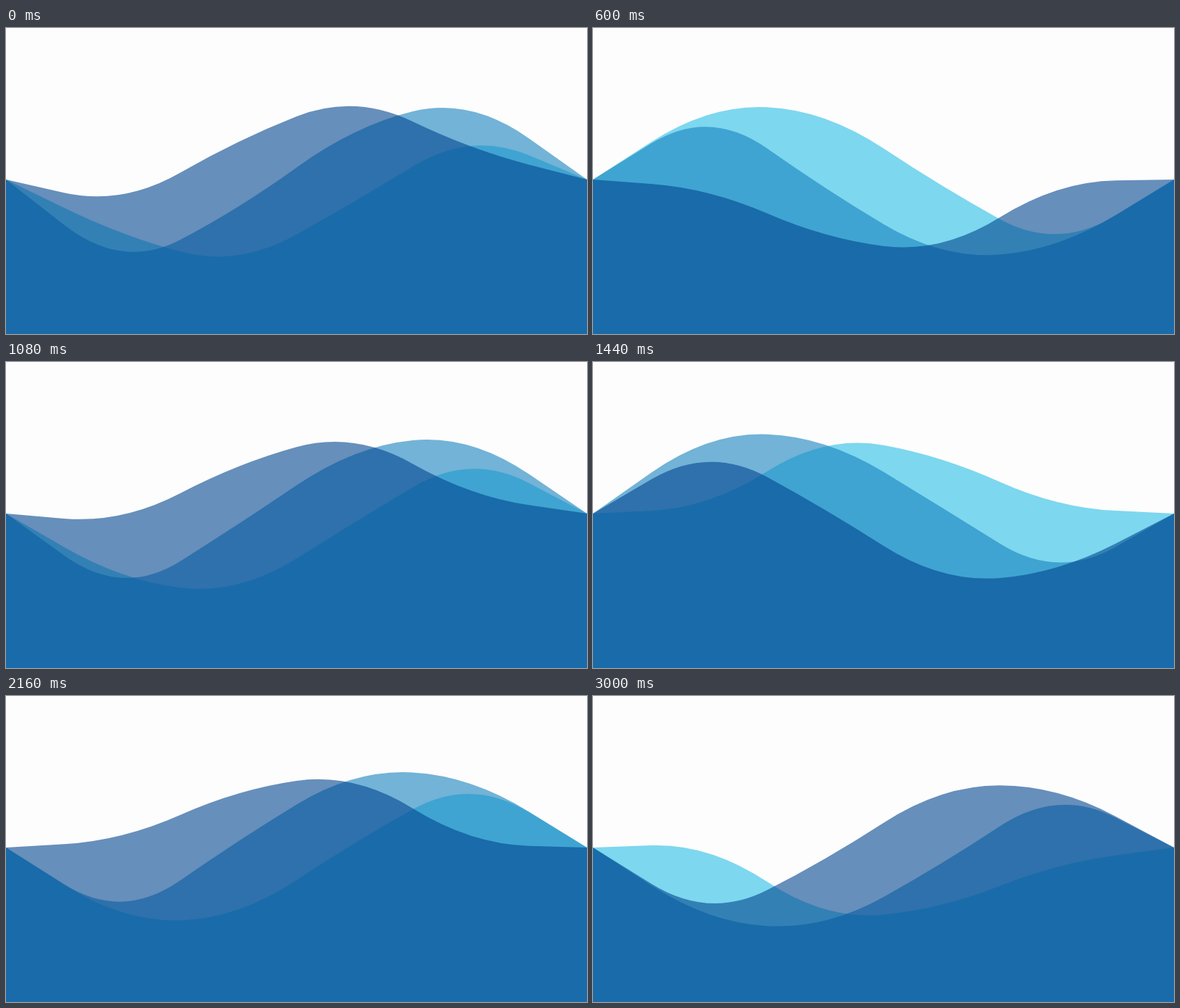
Animation of 800x422 px, one loop 3.04 s. Source, as an HTML page with a canvas:

```html
<!DOCTYPE html>
<html>
<head>
<meta charset="utf-8">
<style>
html, body { margin: 0; width: 100%; height: 100%; overflow: hidden; background: #fdfdfd; }
canvas { display: block; }
</style>
</head>
<body>
<canvas id="stage" width="800" height="422"></canvas>
<script>
const ctx = document.getElementById('stage').getContext('2d');
const W = 800, H = 422, LEVEL = 209, GAP = 160, LOOP = 3040, STEP = 40;

// Back to front: colour and swing of the four inner nodes
const waves = [
  { color: 'rgba(40,191,231,.6)', swing: [109, 124, 91, 110], phase: -1.775 },
  { color: 'rgba(23,131,190,.6)', swing: [128, 121, 122, 114], phase: -0.775 },
  { color: 'rgba(3,70,144,.6)', swing: [107, 91, 119, 88], phase: 0.225 }
];

function drawWave({ color, swing, phase }, angle) {
  const ys = swing.map((a, i) => LEVEL + a * Math.cos(angle + phase + i + 1));
  ys.unshift(LEVEL);
  ys.push(LEVEL);
  ctx.beginPath();
  ctx.moveTo(0, H);
  ctx.lineTo(0, LEVEL);
  ctx.lineTo(GAP / 2, (ys[0] + ys[1]) / 2);
  for (let i = 1; i < 5; i++)
    ctx.quadraticCurveTo(i * GAP, ys[i], (i + 0.5) * GAP, (ys[i] + ys[i + 1]) / 2);
  ctx.lineTo(W, LEVEL);
  ctx.lineTo(W, H);
  ctx.fillStyle = color;
  ctx.fill();
}

function draw(time) {
  ctx.fillStyle = '#fdfdfd';
  ctx.fillRect(0, 0, W, H);
  // the waves advance 0.1 rad per tick, 60 ticks a second
  const angle = Math.ceil(time * 6 / 100) / 10;
  for (const wave of waves) drawWave(wave, angle);
}

const start = performance.now();
function tick() {
  const t = (performance.now() - start) % LOOP;
  draw(Math.floor((t + 2) / STEP) * STEP % LOOP);
  requestAnimationFrame(tick);
}
tick();
</script>
</body>
</html>
```
